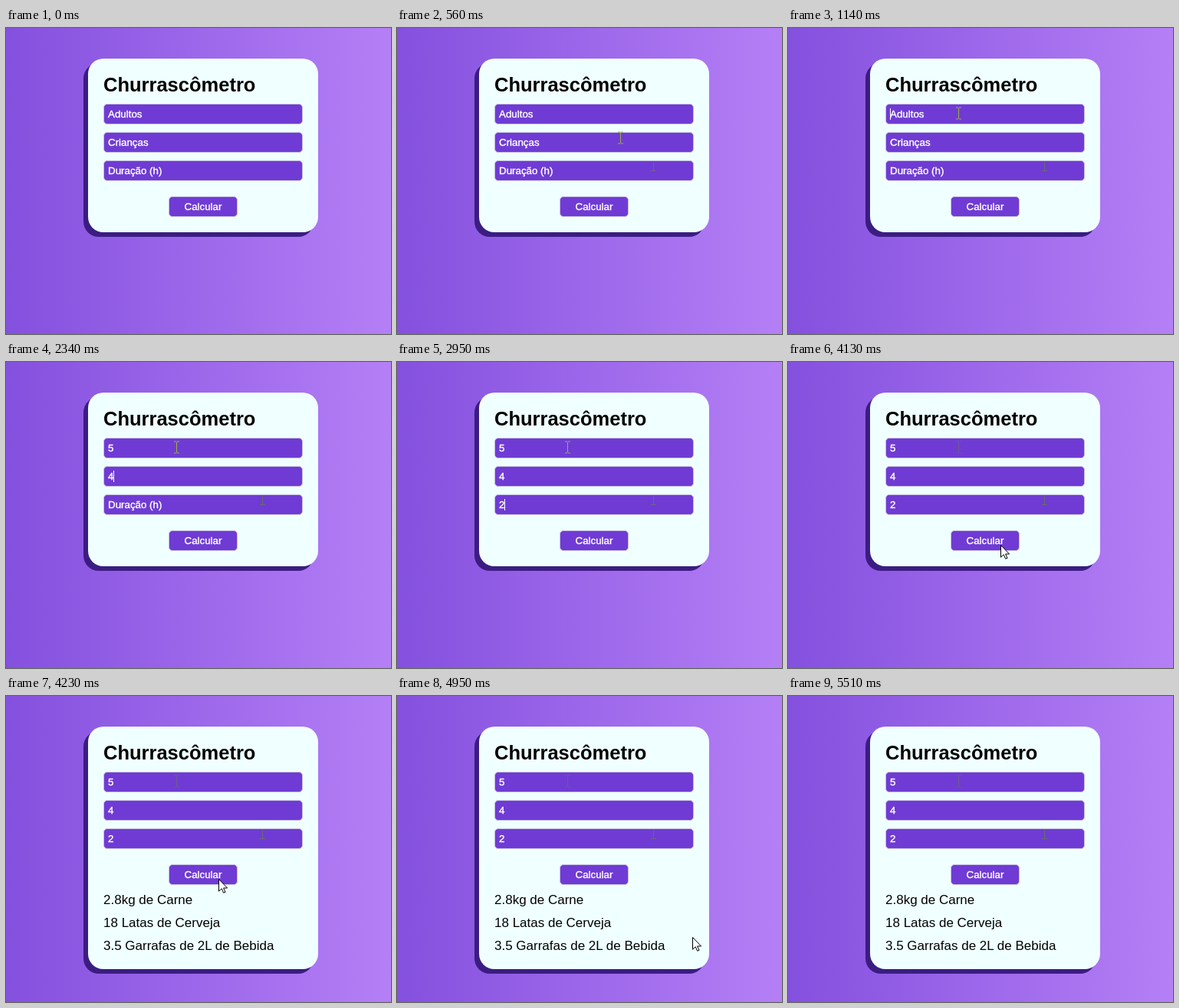
An HTML page that plays this animation: 502x400 px, repeating every 6.15 s.

```html
<!DOCTYPE html>
<html lang="pt-BR">
<head>
<meta charset="utf-8">
<title>Churrascômetro</title>
<style>
  html, body { margin: 0; width: 100%; height: 100%; overflow: hidden; }
  svg {
    display: block; width: 502px; height: 400px;
    background: linear-gradient(to right, #8450de, #b57ff6);
    font-family: "Liberation Sans", Arial, sans-serif;
  }
  .shadow { fill: #3b1d82; }
  .card { fill: #f0ffff; }
  .title { font-size: 25.5px; font-weight: bold; }
  .box { fill: #6f3bd4; stroke: #c8bfe4; }
  .label { font-size: 13.333px; fill: #fff; stroke: #fff; stroke-width: .4px; }
  .result { font-size: 17px; }
  .caret { fill: #fff; }
  .beam { fill: none; stroke: #9cb04c; }
  .trace { fill: none; stroke: #6b6b74; }
  .arrow { fill: #fff; stroke: #000; stroke-linejoin: round; }
</style>
</head>
<body>
<svg viewBox="0 0 502 400">
  <defs>
    <path id="ibeam" d="M-3.5 -7.5h3M.5 -7.5h3M0 -7V7M-3.5 7.5h3M.5 7.5h3"/>
  </defs>
  <rect class="shadow panel" x="101" y="46" width="300" height="227" rx="20"/>
  <rect class="card panel" x="107" y="40" width="300" height="227" rx="20"/>
  <text class="title" x="127" y="83">Churrascômetro</text>
  <g id="fields"></g>
  <rect class="box" x="212.5" y="220.5" width="89" height="26" rx="4.5"/>
  <text class="label" x="257" y="238" text-anchor="middle">Calcular</text>
  <g id="results">
    <text class="result" x="127" y="272">2.8kg de Carne</text>
    <text class="result" x="127" y="302">18 Latas de Cerveja</text>
    <text class="result" x="127" y="332">3.5 Garrafas de 2L de Bebida</text>
  </g>
  <!-- faint marks the pointer leaves behind -->
  <path id="footMark" class="trace" d="M334.5 175V186.5M331 186.5h7"/>
  <use id="beamMark" class="trace" href="#ibeam" x="222.5" y="111.5" opacity=".7"/>
  <rect id="caret" class="caret" width="1" height="15"/>
  <g id="pointer">
    <use id="beam" class="beam" href="#ibeam"/>
    <path id="arrow" class="arrow" d="M.5 .5V16.2L4.2 12.8L6.7 18.3L9 17.3L6.6 12H11.6Z"/>
  </g>
</svg>
<script>
const LOOP = 6150, PRESS = 4130, RELEASE = 4230, BLINK = 530;
const $ = id => document.getElementById(id);
const show = (el, on) => el.setAttribute('visibility', on ? 'visible' : 'hidden');

function add(tag, attrs) {
  const el = document.createElementNS('http://www.w3.org/2000/svg', tag);
  for (const key in attrs) el.setAttribute(key, attrs[key]);
  return $('fields').appendChild(el);
}

const fields = [
  { hint: 'Adultos', value: '5', focus: 930, typed: 1610 },
  { hint: 'Crianças', value: '4', focus: 2010, typed: 2340 },
  { hint: 'Duração (h)', value: '2', focus: 2720, typed: 2950 }
];
fields.forEach((f, i) => {
  f.top = 99 + 37 * i;
  add('rect', { class: 'box', x: 127.5, y: f.top + .5, width: 259, height: 26, rx: 4.5 });
  f.text = add('text', { class: 'label', x: 133, y: f.top + 18 });
});

// Each move bends towards `via` and slows down by `ease`
const moves = [
  { start: 260, end: 810, from: [453, 356], via: [326, 130], to: [230, 115], ease: 1.5 },
  { start: 890, end: 1140, from: [230, 115], via: [228, 110], to: [222, 112], ease: 1 },
  { start: 3480, end: 4000, from: [222, 112], via: [250, 180], to: [277, 239], ease: 2 },
  { start: 4700, end: 5330, from: [277, 239], via: [379, 308], to: [477, 386], ease: 1.5 },
  { start: 5330, end: 5510, from: [477, 386], via: [477, 393], to: [477, 401], ease: 1 }
];

function locate(t) {
  const m = moves.filter(m => m.start <= t).pop();
  const k = Math.min(1, (t - m.start) / (m.end - m.start));
  const u = 1 - (1 - k) ** m.ease, v = 1 - u;
  return m.from.map((a, i) => Math.round(v * v * a + 2 * u * v * m.via[i] + u * u * m.to[i]));
}

function drawPointer(t) {
  const active = t >= moves[0].start && t < moves[moves.length - 1].end;
  const [x, y] = active ? locate(t) : [0, 0];
  const editing = x > 127 && x < 387 && fields.some(f => y >= f.top && y < f.top + 27);
  show($('beam'), active && editing);
  show($('arrow'), active && !editing);
  const shift = editing ? [x + .5, y - .5] : [x, y];
  $('pointer').setAttribute('transform', `translate(${shift})`);
}

function drawCaret(t) {
  const f = fields.filter(f => f.focus <= t).pop();
  const typed = f && t >= f.typed;
  const age = f ? t - (typed ? f.typed : f.focus) : 0;
  show($('caret'), f && t < PRESS && Math.floor(age / BLINK) % 2 === 0);
  if (!f) return;
  $('caret').setAttribute('x', typed ? 140 : 133);
  $('caret').setAttribute('y', f.top + 6);
}

function draw(t) {
  const solved = t >= RELEASE;
  for (const panel of document.querySelectorAll('.panel'))
    panel.setAttribute('height', solved ? 317 : 227);
  show($('results'), solved);
  for (const f of fields) f.text.textContent = t >= f.typed ? f.value : f.hint;
  show($('footMark'), t >= 500);
  show($('beamMark'), t >= 3520);
  drawCaret(t);
  drawPointer(t);
}

const start = performance.now();
function tick() {
  draw((performance.now() - start) % LOOP);
  requestAnimationFrame(tick);
}
tick();
</script>
</body>
</html>
```
